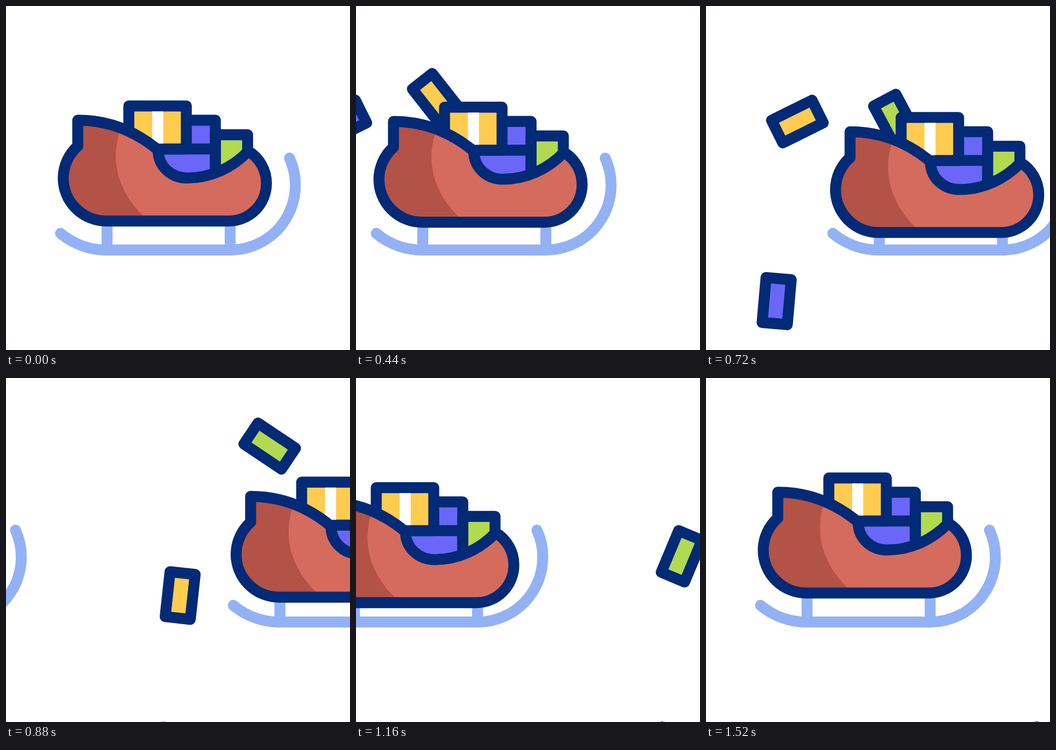
Write an HTML page that moves like this. It is 640 px wide and 640 px high and loops after 1.8 s.

```html
<!DOCTYPE html>
<html lang="en">
<head>
<meta charset="utf-8">
<title>Sleigh</title>
<style>
  html, body { margin: 0; width: 100%; height: 100%; overflow: hidden; background: #fff; }
  svg { display: block; width: 100vw; height: 100vh; }
  .line { stroke: #022a76; stroke-width: 20.4; stroke-linecap: round; stroke-linejoin: round; }
  .rail { stroke: #93b2f5; stroke-width: 20.4; stroke-linecap: round; fill: none; }
</style>
</head>
<body>
<svg id="stage" viewBox="0 0 640 640"></svg>
<script>
const LOOP = 1800, END = 1520;
const YELLOW = '#ffcc50', PURPLE = '#6a66f8', GREEN = '#b1da50';
const HULL = 'M133.5 260.5V212.5C190 212.5 240 232 283 268C283 298 307 320 337 320' +
  'C380 320 420 302 451 270A70 70 0 0 1 484.5 330A70 70 0 0 1 414.5 400' +
  'H186.5A80 80 0 0 1 106.5 320A80 80 0 0 1 133.5 260.5Z';

const gift = color =>
  `<rect class="line gift" x="-23.5" y="-42" width="47" height="84" fill="${color}"/>`;

const sled = (id, shade, gifts) => `
  <g id="${id}">
    <path class="rail" d="M101.5 423A136 136 0 0 0 188 454H417A121 121 0 0 0 527.5 283M188 400V454M417 400V454"/>
    ${gifts}
    <g class="body">
      <path fill="${PURPLE}" d="M283 266H336V212H390V325H300Z"/>
      <path class="line" fill="${GREEN}" d="M389.5 320V239.5H449.5V275"/>
      <path class="line" fill="none" d="M336 212.5H389.5V308M283 266H389.5"/>
      <path class="line" fill="${YELLOW}" d="M228.5 240V186H335.5V266H283Z"/>
      <path fill="#fff" d="M272 196H292.5V256H272Z"/>
      <path fill="#d56b5d" d="${HULL}"/>
      <path fill="#b35246" clip-path="url(#hull)"
        d="M90 200H${222 + shade}L${214 + shade} 232C${196 + shade} 285 ${208 + shade} 345 ${262 + shade} 395V410H90Z"/>
      <path class="line" fill="none" d="${HULL}"/>
    </g>
  </g>`;

const stage = document.getElementById('stage');
stage.innerHTML = `<defs><clipPath id="hull"><path d="${HULL}"/></clipPath></defs>` +
  sled('next', 6, '') +
  sled('main', -2, [PURPLE, YELLOW, GREEN].map(gift).join(''));

const main = document.getElementById('main');
const next = document.getElementById('next');
const bodies = stage.querySelectorAll('.body');
const gifts = stage.querySelectorAll('.gift');
const delays = [0, 280, 620];

// Flight of a gift relative to the sled: time, x, y, angle
const FLIGHT = [
  [0, 245, 290, -10],
  [100, 218, 213, -28],
  [160, 213.4, 173.6, -38],
  [260, 169.5, 127, -56],
  [300, 143, 129.5, -68],
  [360, 95, 153, -88],
  [440, 36, 214, -116],
  [540, 7, 330.5, -157],
  [600, 2.5, 403.5, -173.7],
  [720, -3, 548, -175],
  [880, -11, 693.5, -175]
];

const clamp = (v, a, b) => Math.min(b, Math.max(a, v));
const ease = (t, a, b) => {
  const u = clamp((t - a) / (b - a), 0, 1);
  return u * u * (3 - 2 * u);
};

function slope(i, k) {
  const a = FLIGHT[Math.max(i - 1, 0)];
  const b = FLIGHT[Math.min(i + 1, FLIGHT.length - 1)];
  return (b[k] - a[k]) / (b[0] - a[0]);
}

// Cubic Hermite through the flight points
function flight(time) {
  const t = clamp(time, 0, 880);
  let i = 0;
  while (i < FLIGHT.length - 2 && t > FLIGHT[i + 1][0]) i++;
  const p = FLIGHT[i], q = FLIGHT[i + 1], h = q[0] - p[0];
  const u = (t - p[0]) / h, v = 1 - u;
  return [1, 2, 3].map(k =>
    v * v * (1 + 2 * u) * p[k] + u * u * (3 - 2 * u) * q[k] +
    h * u * v * (v * slope(i, k) - u * slope(i + 1, k)));
}

function bob(t) {
  if (t >= 1470) return 0;
  const u = t / 245 % 2;
  return 21.6 * ease(u < 1 ? u : 2 - u, 0, 1);
}

const move = (el, x, y) => el.setAttribute('transform', `translate(${x} ${y})`);

function draw(now) {
  const t = Math.min(now % LOOP, END);
  move(main, -66.5 * ease(t, 12, 409) + 711.5 * ease(t, 409, 1299), 0);
  move(next, -640 * (1 - ease(t, 648, 1452)), 0);
  bodies.forEach(b => move(b, 0, bob(t)));
  gifts.forEach((g, i) => {
    const [x, y, r] = flight(t - delays[i]);
    g.setAttribute('transform', `translate(${x} ${y}) rotate(${r})`);
  });
}

const start = performance.now();
function tick() {
  draw(performance.now() - start);
  requestAnimationFrame(tick);
}
tick();
</script>
</body>
</html>
```
